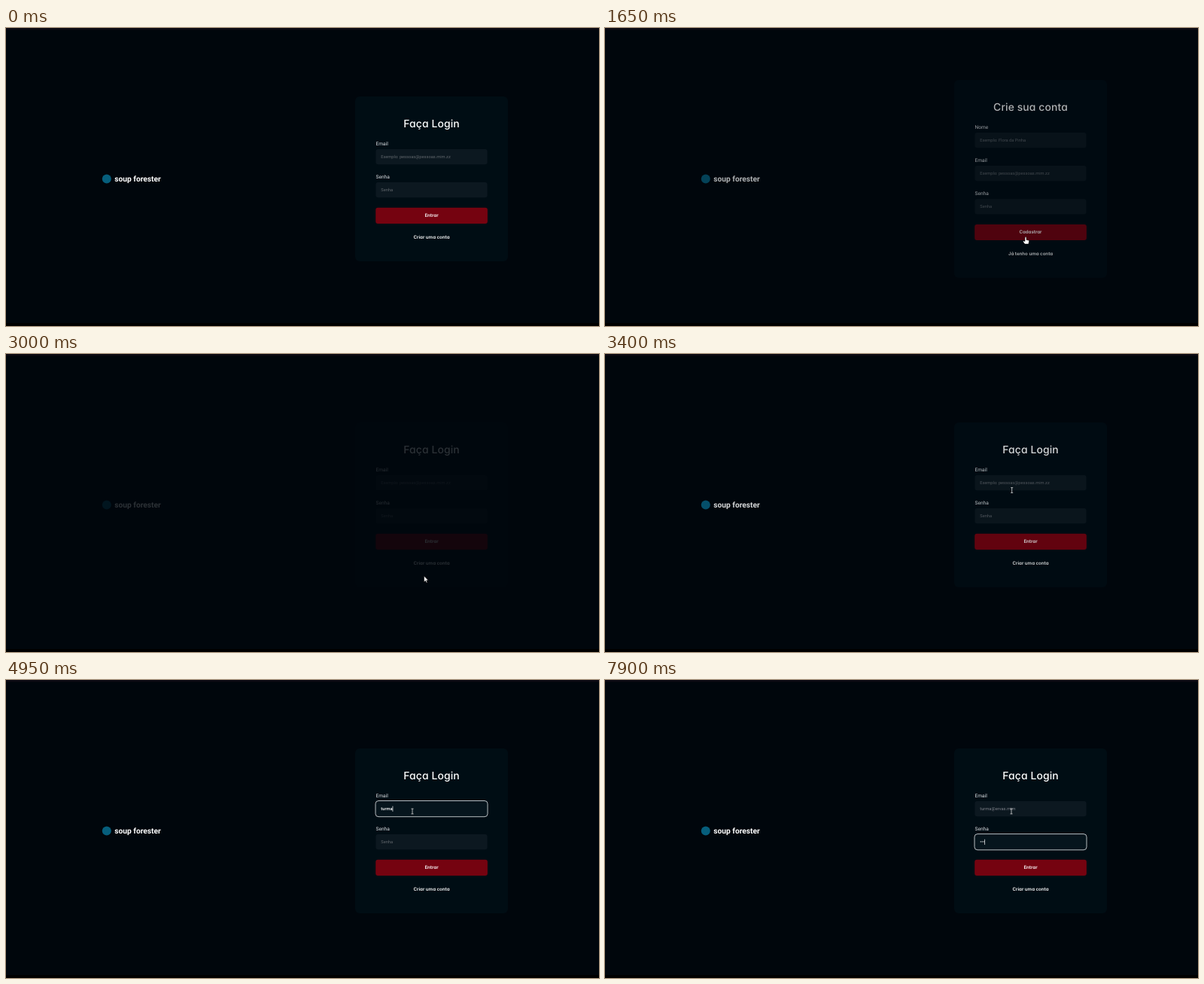
An HTML page that plays this animation: 788 by 396 pixels, repeating every 8 s.

```html
<!DOCTYPE html>
<html lang="pt-BR">
<head>
<meta charset="utf-8">
<title>Login</title>
<style>
  html, body { margin: 0; width: 100%; height: 100%; overflow: hidden; background: #00060c; }
  svg { display: block; width: 100%; height: 100%; text-rendering: geometricPrecision; }
  text { font-family: Roboto, sans-serif; white-space: pre; }
  .brand { font-size: 10.2px; font-weight: 700; fill: #fff; }
  .title, .action { font-family: Inter, sans-serif; font-feature-settings: "cv11"; text-anchor: middle; fill: #fff; }
  .title { font-size: 13.9px; font-weight: 500; letter-spacing: .12px; }
  .action { font-size: 6.15px; font-weight: 600; }
  .label { font-size: 6.6px; fill: #dcdee2; }
  .hint { font-size: 5.7px; fill: #60666b; }
  .filled { font-size: 5.75px; fill: #7c7f87; }
  .typed { font-size: 5.75px; font-weight: 500; fill: #fff; }
</style>
</head>
<body>
<svg viewBox="0 0 788 396">
  <rect width="788" height="2.5" fill="#0c0a13"/>
  <rect y="392" width="788" height="4" fill="#000"/>
  <g id="page"></g>
  <g id="cursor"></g>
</svg>
<script>
const LOOP = 8000;
const TO_SIGNUP = 1250, TO_LOGIN = 2860, FOCUS_EMAIL = 3750, FOCUS_PASSWORD = 7300;
const FADE = 1000;
const LEFT = 491.5, WIDTH = 148, CENTER = 565.5;

const email = {
  text: 'turma@ervas.mim',
  times: [4650, 4720, 4800, 4870, 4950, 5350, 5600, 6100, 6200, 6300, 6450, 6650, 6800, 6950, 7100]
};
const password = { text: '•••', times: [7600, 7750, 7900] };

const emailField = { label: 'Email', hint: 'Exemplo: pessoas@pessoas.mim.zz' };
const passwordField = { label: 'Senha', hint: 'Senha' };
const login = {
  top: 91, title: 'Faça Login', button: 'Entrar', link: 'Criar uma conta',
  fields: [emailField, passwordField]
};
const signup = {
  top: 69, title: 'Crie sua conta', button: 'Cadastrar', link: 'Já tenho uma conta',
  fields: [{ label: 'Nome', hint: 'Exemplo: Flora da Pinha' }, emailField, passwordField]
};

// Cursor stops: time, x, y
const stops = [
  [1100, 567, 284], [1250, 559, 277.5], [1950, 559, 277.5], [2300, 556.5, 302.5],
  [2930, 556.5, 302.5], [3400, 540.7, 181], [3700, 540, 174.5]
];

const shapes = {
  hand: '<path d="M-1 1Q0-.8 1 1V4L3.6 4.6Q4.7 5 4.5 6.2L3.8 9.6H-1.2L-3.6 6.2Q-3 4.8-1 6Z" fill="#fff" stroke="#000" stroke-width=".5"/>',
  arrow: '<path d="M0 0V8L1.9 6.3 3.2 9 4.4 8.4 3.2 5.8H5.6Z" fill="#fff" stroke="#000" stroke-width=".5"/>',
  beam: '<path d="M-1.5-3.4H1.5M0-3.4V3.4M-1.5 3.4H1.5" fill="none" stroke="#d8d8d8" stroke-width=".8"/>'
};

const pageNode = document.getElementById('page');
const cursorNode = document.getElementById('cursor');

const text = (cls, x, y, value) => `<text class="${cls}" x="${x}" y="${y}">${value}</text>`;
const box = (x, y, w, h, r, fill, extra = '') =>
  `<rect x="${x}" y="${y}" width="${w}" height="${h}" rx="${r}" fill="${fill}" ${extra}/>`;
const smooth = p => p * p * (3 - 2 * p);

// The standard "ease" curve: cubic-bezier(.25, .1, .25, 1)
function ease(p) {
  if (p >= 1) return 1;
  const bezier = (u, a, b) => 3 * u * (1 - u) ** 2 * a + 3 * u * u * (1 - u) * b + u ** 3;
  let low = 0, high = 1;
  for (let i = 0; i < 20; i++) {
    const mid = (low + high) / 2;
    if (bezier(mid, .25, .25) < p) low = mid; else high = mid;
  }
  return bezier(low, .1, 1);
}

function typedText(entry, t) {
  return entry.text.slice(0, entry.times.filter(time => time <= t).length);
}

function fieldTop(form, i) {
  return form.top + 70 + i * 44.1;
}

function layout(form) {
  const button = fieldTop(form, form.fields.length) - 10.4;
  return { button, link: button + 39 };
}

function drawField(field, y, value, focused) {
  const body = focused
    ? box(LEFT - .5, y - .5, WIDTH + 1, 21.2, 4, '#06151d', 'stroke="#d8dbdd" stroke-width=".85"')
    : box(LEFT, y, WIDTH, 20.2, 3, '#0c1820');
  const content = value
    ? text(focused ? 'typed' : 'filled', 498.3, y + 12.2, value)
    : text('hint', 498.3, y + 12.2, field.hint);
  return text('label', LEFT, y - 5, field.label) + body + content +
    (focused ? box(498.3, y + 6.6, .7, 7.2, 0, '#fff', 'class="caret"') : '');
}

function drawPage(form, t) {
  const { button, link } = layout(form);
  const active = t < FOCUS_EMAIL || form === signup ? null
    : t < FOCUS_PASSWORD ? emailField : passwordField;
  const values = new Map(form === login
    ? [[emailField, typedText(email, t)], [passwordField, typedText(password, t)]] : []);
  return '<circle cx="133.8" cy="200.5" r="6" fill="#065e7c"/>' +
    text('brand', 144.3, 204.2, 'soup forester') +
    box(464, form.top, 203, 401 - 2 * form.top, 6, '#000d14') +
    text('title', CENTER, form.top + 40.7, form.title) +
    form.fields.map((field, i) =>
      drawField(field, fieldTop(form, i), values.get(field), field === active)).join('') +
    box(LEFT - .3, button, WIDTH + .7, 21.2, 3, '#750310') +
    text('action', CENTER, button + 12.5, form.button) +
    text('action', CENTER, link + 2.3, form.link);
}

function placeCaret() {
  const caret = pageNode.querySelector('.caret');
  const value = pageNode.querySelector('.typed');
  if (caret && value) caret.setAttribute('x', 498.3 + value.getComputedTextLength());
}

function cursorPoint(t) {
  const next = stops.findIndex(stop => stop[0] > t);
  if (next < 0) return stops.at(-1).slice(1);
  const [t0, x0, y0] = stops[next - 1], [t1, x1, y1] = stops[next];
  const p = smooth((t - t0) / (t1 - t0));
  return [x0 + (x1 - x0) * p, y0 + (y1 - y0) * p];
}

function cursorShape(form, y) {
  const { button, link } = layout(form);
  if (y >= button && y <= button + 21 || Math.abs(y - link) < 5) return 'hand';
  const overField = form.fields.some((_, i) => y >= fieldTop(form, i) && y <= fieldTop(form, i) + 20.5);
  return overField ? 'beam' : 'arrow';
}

function drawCursor(form, t) {
  if (t < stops[0][0]) return '';
  const [x, y] = cursorPoint(t);
  return `<g transform="translate(${x} ${y})">${shapes[cursorShape(form, y)]}</g>`;
}

let lastPage = '';
function render(now) {
  const t = now % LOOP;
  const form = t >= TO_SIGNUP && t < TO_LOGIN ? signup : login;
  const shown = t >= TO_LOGIN ? TO_LOGIN : t >= TO_SIGNUP ? TO_SIGNUP : -FADE;
  const page = drawPage(form, t);
  if (page !== lastPage) {
    pageNode.innerHTML = lastPage = page;
    placeCaret();
  }
  pageNode.setAttribute('opacity', ease((t - shown) / FADE));
  cursorNode.innerHTML = drawCursor(form, t);
}

const start = performance.now();
function tick() {
  render(performance.now() - start);
  requestAnimationFrame(tick);
}
tick();
</script>
</body>
</html>
```
